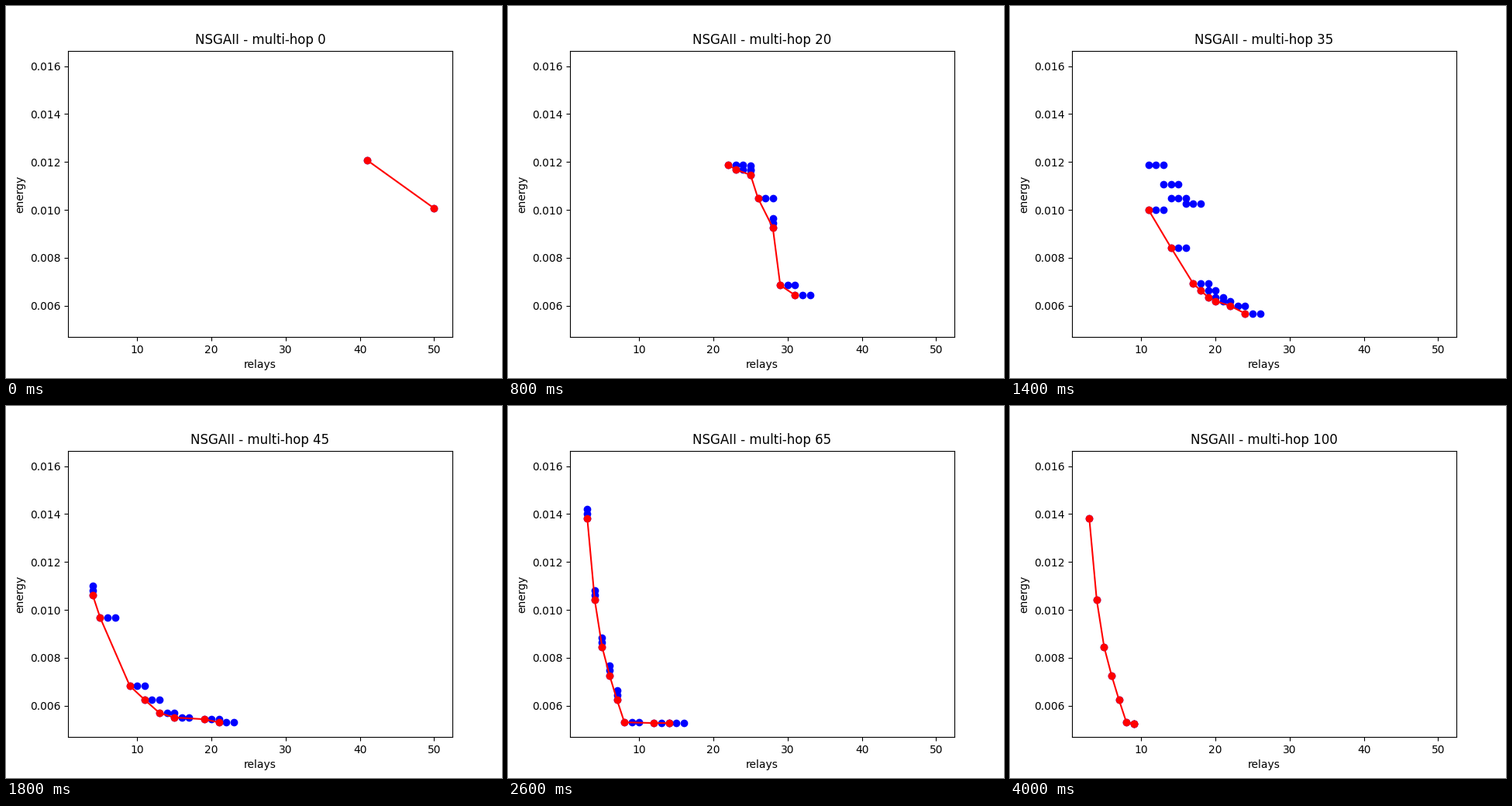
Animation of 640 by 480 pixels, one loop 4.2 s. Source, as a matplotlib script:

```python
import math

import matplotlib.pyplot as plt
import numpy as np
from matplotlib.animation import FuncAnimation

STEP = 5  # hops between pictures
LAST = 20
SAMPLES = 8

# Key fronts as (relays, energy in 1e-4), by generation; others are blended.
KNEE = [(3, 138.2), (4, 104.2), (5, 84.5), (6, 72.7), (7, 62.5), (8, 53.1)]
KEYS = {
    0: [(41, 120.7), (50, 100.7)],
    4: [(22, 118.8), (23, 116.8), (25, 114.6), (26, 104.9), (28, 92.6),
        (29, 68.6), (31, 64.4)],
    6: [(14, 96.8), (20, 70.6), (21, 68.6), (22, 66.7), (23, 64.4), (25, 58.6)],
    9: [(4, 106.2), (5, 96.8), (9, 68.3), (11, 62.5), (13, 57), (15, 55.1),
        (19, 54.4), (21, 53.1)],
    13: KNEE + [(12, 52.8), (14, 52.8)],
    17: KNEE + [(9, 52.6)] * 2,
}
# An older front that lags behind for a while, relative to the left end.
STRAGGLERS = [(0, 118.8), (2, 110.7), (3, 104.9), (5, 102.6)]
LAGGING = range(5, 8)


def resample(points):
    at = np.linspace(0, len(points) - 1, SAMPLES)
    return np.array([np.interp(at, range(len(points)), axis)
                     for axis in zip(*points)]).T


def front_at(i):
    start = max(k for k in KEYS if k <= i)
    end = min((k for k in KEYS if k > i), default=start)
    if start in (i, end):
        return KEYS[start]
    t = (i - start) / (end - start)
    blend = (1 - t) * resample(KEYS[start]) + t * resample(KEYS[end])
    return [(round(x), e) for x, e in blend]


def trail(front, spread):
    """Dominated neighbours: above steep drops, to the right elsewhere."""
    points = []
    for (x, e), (next_x, next_e) in zip(front, front[1:] + front[-1:]):
        steep = e - next_e > 8 * max(next_x - x, 1)
        for k in range(1, spread + 1):
            points.append((x, e + 2 * k) if steep else (x + k, e))
    return points


def population_at(i, front):
    spread = min(2, i, math.ceil((LAST - i) / 3))
    points = front + trail(front, spread)
    if i in LAGGING:
        old = [(front[0][0] + dx, e) for dx, e in STRAGGLERS]
        points += old + trail(old, spread)
    return points


plt.rcParams["font.family"] = "DejaVu Sans"
fig, ax = plt.subplots(figsize=(6.4, 4.8), dpi=100)
ax.set(xlim=(0.67, 52.47), ylim=(0.004694, 0.016646),
       xlabel="relays", ylabel="energy")
population, = ax.plot([], [], "bo")
best, = ax.plot([], [], "ro-")
title = ax.set_title("")


def set_points(line, points):
    line.set_data([x for x, _ in points], [e * 1e-4 for _, e in points])


def update(i):
    front = front_at(i)
    set_points(population, population_at(i, front))
    set_points(best, front)
    title.set_text(f"NSGAII - multi-hop {i * STEP}")
    return population, best, title


anim = FuncAnimation(fig, update, frames=LAST + 1, interval=200,
                     repeat=True, repeat_delay=0)
plt.show()
```
